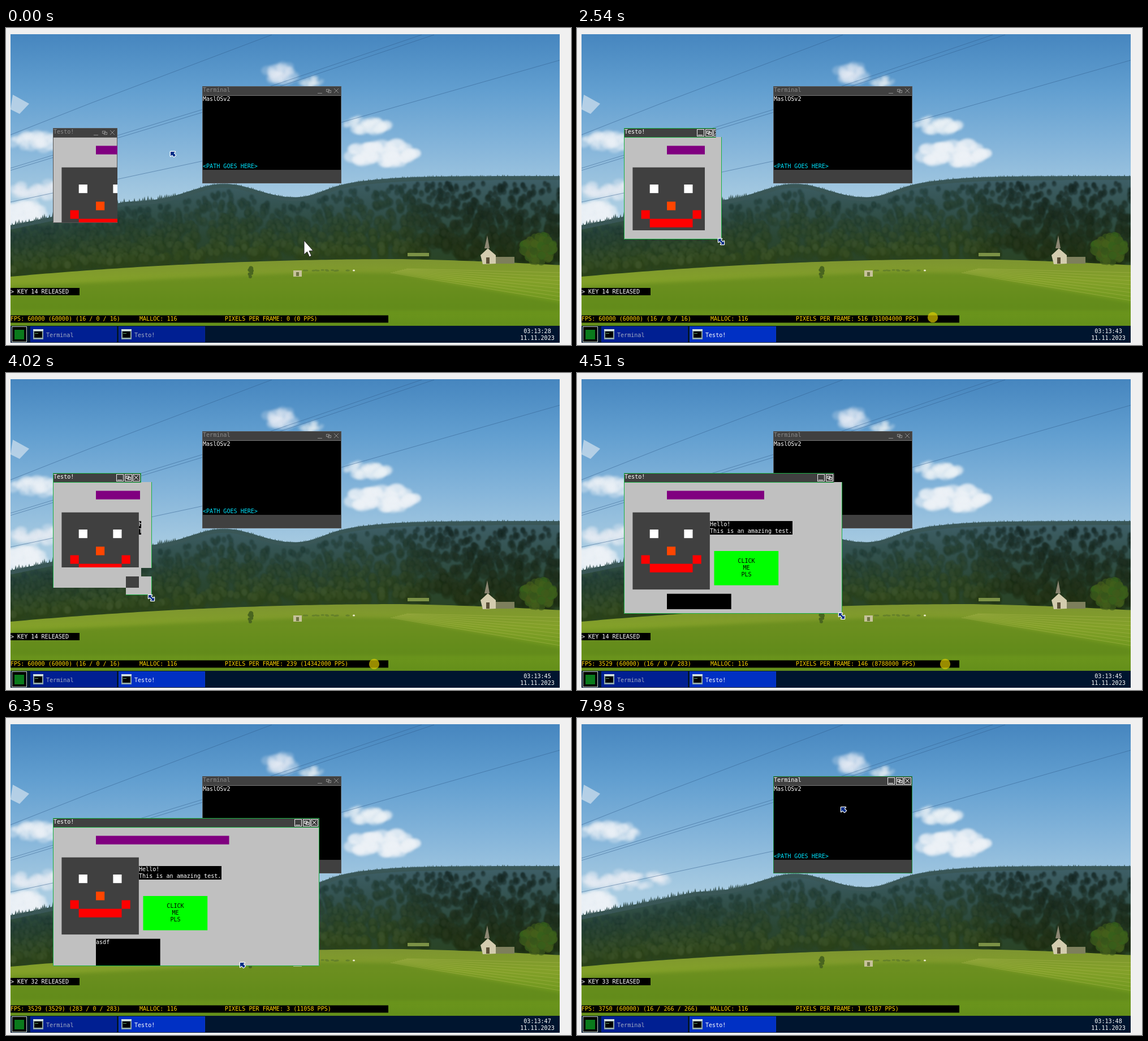
An HTML page with a canvas for the animation above (8000 ms loop, 999x561 px).

```html
<!DOCTYPE html>
<html lang="en">
<head>
<meta charset="utf-8">
<title>Desktop</title>
<style>
  html, body { margin: 0; width: 100%; height: 100%; overflow: hidden; background: #f0f0f0; }
  canvas { display: block; }
</style>
</head>
<body>
<canvas id="stage" width="999" height="561"></canvas>
<script>
const LOOP = 8000, STEP = 97.3;
const stage = document.getElementById('stage').getContext('2d');
let g = stage;

const clamp = (v, low, high) => Math.min(high, Math.max(low, v));
const sigmoid = v => 1 / (1 + Math.exp(-v));
const smooth = u => u * u * (3 - 2 * u);

const rect = (color, x, y, w, h) => { g.fillStyle = color; g.fillRect(x, y, w, h); };
const frame = (color, x, y, w, h) => {
  g.strokeStyle = color; g.lineWidth = 1; g.strokeRect(x + .5, y + .5, w - 1, h - 1);
};
function trace(points, close) {
  g.beginPath();
  points.forEach(([x, y]) => g.lineTo(x, y));
  if (close) g.closePath();
}
const poly = (color, points) => { g.fillStyle = color; trace(points, true); g.fill(); };
function line(color, ...points) {
  g.strokeStyle = color; g.lineWidth = 1; trace(points); g.stroke();
}
function oval(color, x, y, rx, ry = rx) {
  g.fillStyle = color; g.beginPath(); g.ellipse(x, y, rx, ry, 0, 0, 7); g.fill();
}
function text(str, x, y, color, align = 'left') {
  g.font = '10.07px "DejaVu Sans Mono", monospace';
  g.textBaseline = 'middle'; g.textAlign = align;
  g.fillStyle = color; g.fillText(str, x, y);
}
function shade(x0, y0, x1, y1, ...colors) {
  const s = g.createLinearGradient(x0, y0, x1, y1);
  colors.forEach((c, i) => s.addColorStop(i / (colors.length - 1), c));
  return s;
}
function clipped(x, y, w, h, draw) {
  g.save(); g.beginPath(); g.rect(x, y, w, h); g.clip(); draw(); g.restore();
}
function seeded(seed) {
  return () => (seed = (seed * 16807) % 2147483647) / 2147483647;
}
// Value at step k on a path of [step, x, y] keys
function track(keys, k, ease = u => u) {
  const i = keys.findIndex(key => key[0] > k);
  if (i < 1) return keys[i ? keys.length - 1 : 0].slice(1);
  const [from, x, y] = keys[i - 1], [to, x2, y2] = keys[i];
  const u = ease((k - from) / (to - from));
  return [x + (x2 - x) * u, y + (y2 - y) * u];
}

/* ---------- wallpaper ---------- */
const rnd = seeded(77);
const spread = size => (rnd() - .5) * 2 * size;

const ridgeAt = x => 308 + 43 * Math.max(0, 1 - x / 210)
  - 32 * Math.exp(-(((x - 385) / 85) ** 2))
  - 22 * sigmoid((x - 558) / 18) - 24 * sigmoid((x - 600) / 50);
const meadowAt = x => 409 + 31 * ((700 - x) / 692) ** 2 + Math.max(0, x - 700) * .02;

function outline(heightAt) {
  const points = [];
  for (let x = 8; x <= 980; x += 9) points.push([x, heightAt(x)]);
  return [...points, [980, 557], [8, 557]];
}
function blob(x, y, w, h, count, paint) {
  for (let i = 0; i < count; i++) {
    const a = rnd() * 6.3, d = Math.sqrt(rnd());
    paint(x + Math.cos(a) * d * w, y + Math.sin(a) * d * h);
  }
}
function cloud(x, y, w, h, alpha) {
  blob(x, y, w * .85, h * .7, 12 + w * .7, (px, py) => {
    const r = h * (.18 + rnd() * .24);
    oval(`rgba(236,241,246,${alpha})`, px, py, r * 1.4, r);
  });
}
function forest() {
  for (let x = 8; x < 980; x += 3) {
    const y = ridgeAt(x), tall = x < 300 ? 9 : 3;
    poly('#3a5757', [[x - 3, y + 7], [x, y - rnd() * tall], [x + 3, y + 7]]);
  }
  g.filter = 'blur(1px)';
  for (let i = 0; i < 1300; i++) {
    const u = i / 1300, x = 8 + rnd() * 971, top = ridgeAt(x) + 12;
    const y = top + (meadowAt(x) - 9 - top) * u, r = 4 + u * 6;
    const dim = 1 - .34 * sigmoid((x - 730) / 25), lit = rnd() * 14 * (.4 + u);
    const tone = add => `rgba(${[38 + u * 14, 65 + u * 10, 62 - u * 30].map(v => (v + add) * dim | 0)},.5)`;
    oval(tone(-8), x, y + r * .3, r, r * 1.2);
    oval(tone(lit), x - r * .2, y - r * .3, r * .6, r * .7);
  }
  g.filter = 'none';
}
function meadow() {
  poly(shade(0, 408, 0, 527, '#7d9430', '#83a029', '#6f981e', '#648f1a'), outline(meadowAt));
  g.filter = 'blur(3px)';
  poly('rgba(92,132,26,.6)', [[8, 458], [300, 443], [560, 432], [690, 434], [979, 486], [979, 500], [8, 500]]);
  g.filter = 'none';
  for (let i = 0; i < 8; i++)
    line('rgba(176,186,84,.45)', [680 + i * 4, 433 - i], [979, 482 - i * 7]);
}
function landmarks() {
  g.filter = 'blur(.6px)';
  rect('#7b9146', 710, 398, 38, 6);
  rect('#7d7f5c', 866, 405, 33, 12);
  poly('#d3ccae', [[839, 402], [852, 390], [866, 402], [866, 417], [843, 418]]);
  poly('#8b8672', [[846, 390], [851, 367], [855, 390]]);
  rect('#5a5037', 849, 406, 6, 11);
  rect('#c6c29a', 508, 429, 15, 11);
  rect('#6f7544', 513, 432, 5, 7);
  oval('#ecebd0', 615, 429, 2, 1.5);
  blob(432, 431, 3, 9, 12, (x, y) => oval('#49651f', x, y, 3));
  blob(565, 429, 40, 1, 14, (x, y) => oval('#65812a', x, y, 3, 1.5));
  blob(941, 390, 28, 24, 90, (x, y) =>
    oval(`rgba(${50 + rnd() * 20 | 0},${80 + rnd() * 22 | 0},27,.7)`, x, y, 7));
  g.filter = 'none';
}
function paintWallpaper() {
  rect(shade(0, 11, 0, 310, '#4686bf', '#629fd0', '#85b5da', '#a9cce2'), 8, 11, 971, 546);
  g.filter = 'blur(2px)';
  cloud(60, 202, 58, 22, .38);
  cloud(85, 288, 92, 20, .32);
  cloud(30, 328, 42, 26, .6);
  cloud(486, 80, 28, 24, .25);
  cloud(540, 96, 22, 12, .3);
  cloud(640, 172, 46, 20, .45);
  cloud(670, 222, 72, 27, .6);
  g.filter = 'none';
  poly('rgba(205,222,236,.75)', [[12, 118], [41, 134], [24, 152], [8, 144]]);

  const wire = 'rgba(48,92,140,.5)';
  line(wire, [8, 189], [150, 133], [470, 12]);
  line(wire, [8, 252], [345, 150], [757, 12]);
  line(wire, [8, 248], [345, 145], [735, 12]);
  line(wire, [8, 308], [345, 236], [593, 167], [979, 57]);

  poly(shade(0, 262, 0, 430, '#3f6069', '#33524f', '#2a4632', '#2a431f'), outline(ridgeAt));
  forest();
  meadow();
  landmarks();
}
const wallpaper = document.createElement('canvas');
wallpaper.width = 999; wallpaper.height = 561;
g = wallpaper.getContext('2d');
rect('#f0f0f0', 0, 0, 999, 561);
clipped(8, 11, 971, 546, paintWallpaper);
g = stage;

/* ---------- windows ---------- */
const CELL = 15.16;

function titleButtons(right, y, active) {
  const c = active ? '#f0f0f0' : '#8c8c8c';
  const [min, max, close] = [38.5, 23.5, 9].map(d => Math.round(right - d));
  if (active) for (const x of [min, max, close]) frame(c, x - 6, y - 6, 13, 13);
  line(c, [min - 4, y + 4.5], [min + 4, y + 4.5]);
  frame(c, max - 4, y - 3, 6, 5);
  frame(c, max - 1, y - 1, 6, 5);
  line(c, [close - 4, y - 4], [close + 4, y + 4]);
  line(c, [close + 4, y - 4], [close - 4, y + 4]);
}
function terminal(active) {
  rect('#404040', 348, 104, 245, 171);
  rect('#000', 348, 120, 245, 131);
  line('#777', [348, 119.5], [593, 119.5]);
  frame(active ? '#1c8a3c' : '#555', 347, 103, 246, 172);
  text('Terminal', 348, 110.5, active ? '#fff' : '#8c8c8c');
  titleButtons(593, 111, active);
  text('MaslOSv2', 348, 126.5, '#fff');
  text('<PATH GOES HERE>', 348, 245.5, '#00e5ff');
}
function testoContent(width, typed) {
  const cell = (color, x, y, w = 1, h = 1) =>
    rect(color, 98.4 + x * CELL, 246.7 + y * CELL, w * CELL, h * CELL);
  rect('#800080', 159, 208.5, width / 2, CELL);
  cell('#404040', 0, 0, 9, 9);
  for (const side of [-1, 1]) {
    cell('#fff', 4 + side * 2, 2);
    cell('#f00', 4 + side * 3, 5);
  }
  cell('#ff4500', 4, 4);
  cell('#f00', 2, 6, 5);
  rect('#000', 235, 262, 146, 24);
  text('Hello!', 235, 268.5, '#fff');
  text('This is an amazing test.', 235, 280.5, '#fff');
  rect('#0f0', 242.5, 315, 7.5 * CELL, 4 * CELL);
  ['CLICK', 'ME', 'PLS'].forEach((s, i) => text(s, 299.5, 333.5 + i * 12, '#000', 'center'));
  rect('#000', 159, 390.7, 7.5 * CELL, 60);
  text(typed, 159, 397, '#fff');
}

// Lower right corner of the resized window
const CORNER = [[24, 197, 345], [30, 373, 431], [31, 424, 442], [34, 540, 470],
  [38, 239, 345], [40, 239, 345], [41, 258, 393], [48, 554, 439]];

// Title and content redraw late while the corner is dragged
function testo(k, active, typed) {
  const [right, bottom] = track(CORNER, k).map(Math.round);
  const [oldRight, oldBottom] = track(CORNER, k - 1).map(Math.round);
  const torn = bottom - oldBottom > 40;
  const edge = active ? '#18b044' : '#555';
  const titleRight = torn ? oldRight : right;
  const shown = oldRight + (titleRight - oldRight) * .65;
  const w = Math.min(right, oldRight) - 83, h = Math.min(bottom, oldBottom) - 193;

  const body = () => {
    rect('#c0c0c0', 83, 193, right - 83, bottom - 193);
    line(edge, [83.5, 177], [83.5, bottom - .5], [right - .5, bottom - .5], [right - .5, 193]);
  };
  if (torn) {
    clipped(83, 177, right - 83, oldBottom - 177, body);
    clipped(83, oldBottom, oldRight - 83, 35, body);
    clipped(212, 360, right - 212, bottom - 360, body);
    rect('#404040', 212, 360, 23, 20);
  } else body();
  clipped(84, 193, w - 1, h - 1, () => testoContent(w, typed));
  clipped(83, 177, shown - 83, 17, () => {
    rect('#404040', 83, 177, titleRight - 83, 17);
    frame(edge, 83, 177, titleRight - 83, 17);
    text('Testo!', 84, 184, active ? '#fff' : '#8c8c8c');
    titleButtons(titleRight, 185, active);
  });
}

/* ---------- pointer ---------- */
const ROUTE = [[1, 290, 218], [6, 280, 213], [15, 147, 187], [22, 195, 345], [48, 550, 440],
  [51, 320, 318], [54, 265, 401], [62, 265, 401], [65, 413, 432], [71, 590, 285], [75, 542, 182], [82, 466, 157]];
const ARROW = [[0, 0], [8, 0], [5.5, 2.5], [9, 6], [6, 9], [2.5, 5.5], [0, 8]];
const HALF = [[-5, 1], [-5, -5], [1, -5], [-1, -3], [3, 1]];
const RESIZE = [...HALF, ...HALF.map(([x, y]) => [-x, -y])];
const dragging = k => k >= 24 && k <= 48;

function glyph(x, y, points) {
  g.save(); g.translate(Math.round(x), Math.round(y));
  trace(points, true);
  g.lineJoin = 'round'; g.lineWidth = 2.4; g.strokeStyle = '#fff'; g.stroke();
  g.fillStyle = '#002c86'; g.fill();
  g.restore();
}
function pointer(k) {
  if (dragging(k)) {
    const [right, bottom] = track(CORNER, k);
    glyph(right - 1, bottom + 4.5, RESIZE);
  } else {
    const [x, y] = track(ROUTE, k, smooth);
    glyph(x + 1, y + 1, ARROW);
  }
}
function hostPointer(k) {
  if (k < 1) {
    poly('#fff', [[527, 376], [527, 401], [532.5, 396], [536.5, 405], [540, 403], [536, 394.5], [543, 394]]);
    g.strokeStyle = '#222'; g.lineWidth = 1; g.stroke();
  } else if (dragging(k)) {
    const u = clamp((k - 34) / 7, 0, 1);
    oval('rgba(225,205,0,.68)', 629 + 22 * u, 512 + 3 * u, 9.2);
  }
}

/* ---------- status and taskbar ---------- */
function frameRates(k) {
  if (k < 44) return '60000 (60000) (16 / 0 / 16)';
  if (k < 58) return '3529 (60000) (16 / 0 / 283)';
  return k < 72 ? '3529 (3529) (283 / 0 / 283)' : '3750 (60000) (16 / 266 / 266)';
}
function pixelRates(k) {
  if (dragging(k)) {
    const thousands = Math.round(25450 - 1110.8 * (k - 31));
    return `${Math.floor(thousands / 60)} (${thousands}000 PPS)`;
  }
  if (k < 63) return '0 (0 PPS)';
  return k < 73 ? '3 (11058 PPS)' : '1 (5187 PPS)';
}
function status(k) {
  const released = clamp(Math.floor((k - 58) / 2), 0, 4);
  const yellow = '#ffd800';
  rect('#000', 8, 460, 122, 13);
  text(`> KEY ${released ? 29 + released : 14} RELEASED`, 8, 467, '#fff');
  rect('#000', 8, 508.5, 668, 13);
  text('FPS: ' + frameRates(k), 8, 515.5, yellow);
  text('MALLOC: 116', 236, 515.5, yellow);
  text('PIXELS PER FRAME: ' + pixelRates(k), 387, 515.5, yellow);
}
function taskButton(label, x, active) {
  rect(active ? '#0030c4' : '#001f92', x, 528, 153, 28);
  frame(active ? '#0838cc' : '#04259a', x, 528, 153, 28);
  rect('#8fa8a8', x + 5, 533, 18, 18);
  rect('#d8e4e4', x + 5, 533, 18, 3);
  rect('#000', x + 7, 537, 14, 11);
  line('#5f9f6a', [x + 8, 540.5], [x + 14, 540.5]);
  text(label, x + 28, 544, active ? '#fff' : '#a4acc4');
}
function taskbar(k) {
  const seconds = k < 11 ? 28 : 42 + clamp(Math.floor((k - 13) / 9.2), 0, 6);
  rect('#00152f', 8, 527, 971, 30);
  rect('#000', 10, 528, 27, 28);
  frame('#c8d0c8', 10, 528, 27, 28);
  rect('#0a7a1c', 15, 534, 17, 17);
  taskButton('Terminal', 43, false);
  taskButton('Testo!', 199, k >= 23);
  text('03:13:' + seconds, 939.5, 537, '#fff', 'center');
  text('11.11.2023', 939.5, 549, '#fff', 'center');
}

function draw(now) {
  const k = Math.floor((now % LOOP + 10) / STEP), closed = k >= 77;
  const typed = 'asdf'.slice(0, clamp(Math.floor((k - 56) / 1.7), 0, 4));
  g.drawImage(wallpaper, 0, 0);
  status(k);
  terminal(closed);
  if (!closed) testo(k, k >= 23, typed);
  taskbar(k);
  pointer(k);
  hostPointer(k);
}
const start = performance.now();
function tick() {
  draw(performance.now() - start);
  requestAnimationFrame(tick);
}
tick();
</script>
</body>
</html>
```
